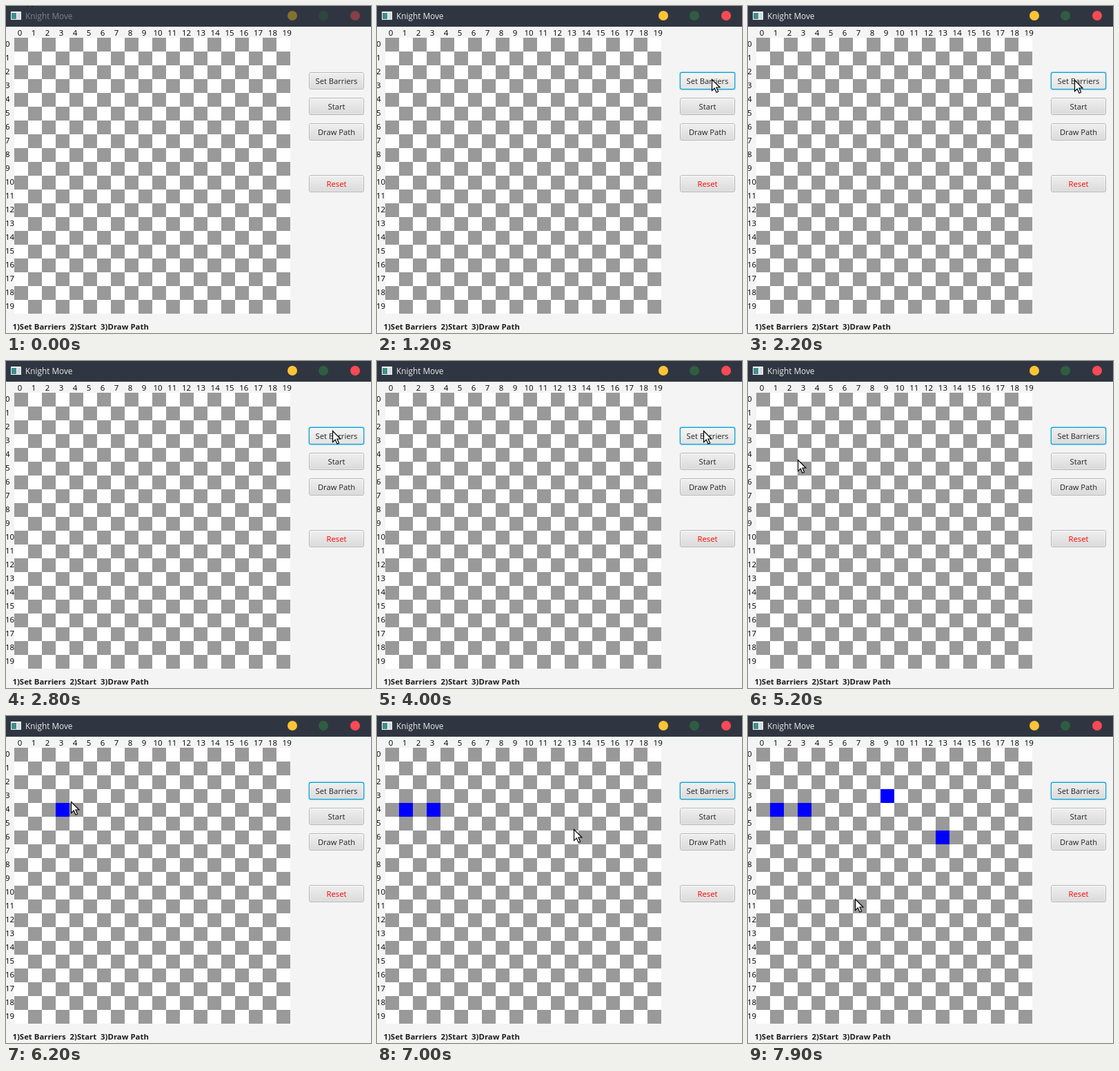
Animation, 529 px wide and 474 px high, one loop 8000 ms. Source, as an HTML page:

```html
<!DOCTYPE html>
<html lang="en">
<head>
<meta charset="utf-8">
<title>Knight Move</title>
<style>
  html, body { margin: 0; width: 100%; height: 100%; overflow: hidden; background: #f4f4f4; }
  svg { display: block; width: 529px; height: 474px; }
  text { font: 11.2px "Open Sans", "Noto Sans", sans-serif; white-space: pre; }
  .mid { text-anchor: middle; }
  #title { font-size: 11.8px; fill: #7d818a; }
  #help { font-size: 11.4px; font-weight: 700; fill: #1c1c1c; }
  .label { font-size: 11.5px; fill: #000; }
  .glow { fill: none; }
  .face { fill: url(#idle); stroke: #b6b6b6; }
  .rim { fill: none; stroke: url(#shine); }
  .caption { fill: #222; }
  .reset .caption { fill: #f00; }
  .focus .glow { fill: #039ed3; fill-opacity: .14; }
  .focus .face { stroke: #039ed3; stroke-width: 1.3; }
  .hover .face { fill: url(#hover); }
  .press .face { fill: url(#press); }
  .min { fill: #85712f; }
  .max { fill: #2f4540; }
  .close { fill: #853f49; }
  .active #title { fill: #e9eaec; }
  .active .min { fill: #fdc436; }
  .active .max { fill: #2f5d42; }
  .active .close { fill: #fb4a55; }
</style>
</head>
<body>
<svg viewBox="0 0 529 474">
  <defs>
    <linearGradient id="idle" x2="0" y2="1"><stop stop-color="#efefef"/><stop offset="1" stop-color="#dadada"/></linearGradient>
    <linearGradient id="hover" x2="0" y2="1"><stop stop-color="#f5f5f5"/><stop offset="1" stop-color="#e2e2e2"/></linearGradient>
    <linearGradient id="press" x2="0" y2="1"><stop stop-color="#dcdcdc"/><stop offset="1" stop-color="#cacaca"/></linearGradient>
    <linearGradient id="shine" x2="0" y2="1"><stop stop-color="#fbfbfb"/><stop offset="1" stop-color="#e4e4e4"/></linearGradient>
    <pattern id="checks" x="12" y="46" width="40" height="40" patternUnits="userSpaceOnUse">
      <path d="M0 0h20v20H0zM20 20h20v20H20z" fill="#999" shape-rendering="crispEdges"/>
    </pattern>
  </defs>
  <rect width="529" height="474" fill="#f4f4f4"/>
  <g id="bar">
    <rect width="529" height="30" fill="#303641"/>
    <path id="scrap" d="M30 0h2v1h-2zM37 0h2v1h-2z" fill="#0b0d10"/>
    <rect x="7" y="8" width="15" height="12" fill="#f2f4f5"/>
    <rect x="8" y="10" width="7" height="9" fill="#3f8f8b"/>
    <rect x="16" y="10" width="5" height="9" fill="#d5dcde"/>
    <text id="title" x="28" y="19">Knight Move</text>
    <circle class="min" cx="415" cy="14" r="7"/>
    <circle class="max" cx="460" cy="14" r="7"/>
    <circle class="close" cx="506" cy="14" r="7"/>
  </g>
  <rect x="12" y="46" width="400" height="400" fill="#fff"/>
  <rect x="12" y="46" width="400" height="400" fill="url(#checks)"/>
  <g id="labels"></g>
  <g id="barriers" fill="#00f"></g>
  <g id="buttons"></g>
  <text id="help" x="9.5" y="469">1)Set Barriers  2)Start  3)Draw Path</text>
  <path id="cursor" d="M.5 .5V16.6L4.2 13.1L7 19.2L9.6 18L6.9 12H11.9Z" fill="#fff" stroke="#000" stroke-width="1.2"/>
</svg>
<script>
const LOOP = 8000, STEP = 100, CELL = 20, LEFT = 12, TOP = 46;
const $ = id => document.getElementById(id);

function add(parent, tag, attrs, text = '') {
  const el = document.createElementNS('http://www.w3.org/2000/svg', tag);
  for (const key in attrs) el.setAttribute(key, attrs[key]);
  el.textContent = text;
  return parent.appendChild(el);
}

for (let i = 0; i < 20; i++) {
  // Two-digit headings sit slightly wider apart
  const x = 20 + CELL * i + Math.max(0, i - 10) * .8;
  add($('labels'), 'text', { class: 'label mid', x, y: 43 }, i);
  add($('labels'), 'text', { class: 'label', x: -1, y: 59 + CELL * i }, i);
}

function addButton(name, y, cls = '') {
  const g = add($('buttons'), 'g', { class: cls });
  const box = (cls, inset, rx) => add(g, 'rect', {
    class: cls, x: 439 + inset, y: y + inset, width: 80 - 2 * inset, height: 25 - 2 * inset, rx
  });
  box('glow', -1.4, 4);
  box('face', .5, 2.5);
  box('rim', 1.5, 1.5);
  add(g, 'text', { class: 'caption mid', x: 479, y: y + 17 }, name);
  return g;
}
const setButton = addButton('Set Barriers', 96);
addButton('Start', 133);
addButton('Draw Path', 170);
addButton('Reset', 245, 'reset');

const barriers = [];
function addBarrier(col, row, at) {
  const el = add($('barriers'), 'rect', { x: LEFT + CELL * col, y: TOP + CELL * row, width: CELL, height: CELL });
  barriers.push({ el, at });
}
addBarrier(3, 4, 5500);
addBarrier(1, 4, 6400);
addBarrier(9, 3, 7100);
addBarrier(13, 6, 7500);

// The pointer rests between moves; a bow bends the way there
const moves = [];
function move(from, to, x, y, bowX = 0, bowY = 0) {
  moves.push({ from, to, x, y, bowX, bowY });
}
move(300, 500, 200, 15);
move(800, 1200, 485, 106);
move(1600, 2200, 473, 107, -28, 12);
move(2400, 2800, 473, 101, 12, -8);
move(4000, 4800, 80, 136);
move(4900, 5200, 72, 143);
move(5200, 5500, 37, 130);
move(6000, 6500, 200, 112);
move(6600, 7000, 285, 164);
move(7200, 7900, 155, 265);

function pointer(t) {
  let x = 188, y = -24;
  for (const m of moves) {
    const u = Math.min(1, Math.max(0, (t - m.from) / (m.to - m.from)));
    const k = u * u * (3 - 2 * u), bend = Math.sin(Math.PI * u);
    x += (m.x - x) * k + m.bowX * bend;
    y += (m.y - y) * k + m.bowY * bend;
  }
  return [Math.round(x), Math.round(y)];
}

function draw(now) {
  const t = Math.floor(now % LOOP / STEP) * STEP;
  const [x, y] = pointer(t);
  const active = t >= 800;
  const over = x >= 439 && x < 519 && y >= 96 && y < 121;
  $('cursor').setAttribute('transform', `translate(${x} ${y})`);
  $('scrap').style.display = t < 300 ? '' : 'none';
  $('bar').classList.toggle('active', active);
  setButton.classList.toggle('focus', active);
  setButton.classList.toggle('hover', over);
  setButton.classList.toggle('press', t >= 3300 && t < 4000);
  for (const b of barriers) b.el.style.display = t >= b.at ? '' : 'none';
}

const start = performance.now();
function tick() {
  draw(performance.now() - start);
  requestAnimationFrame(tick);
}
tick();
</script>
</body>
</html>
```
